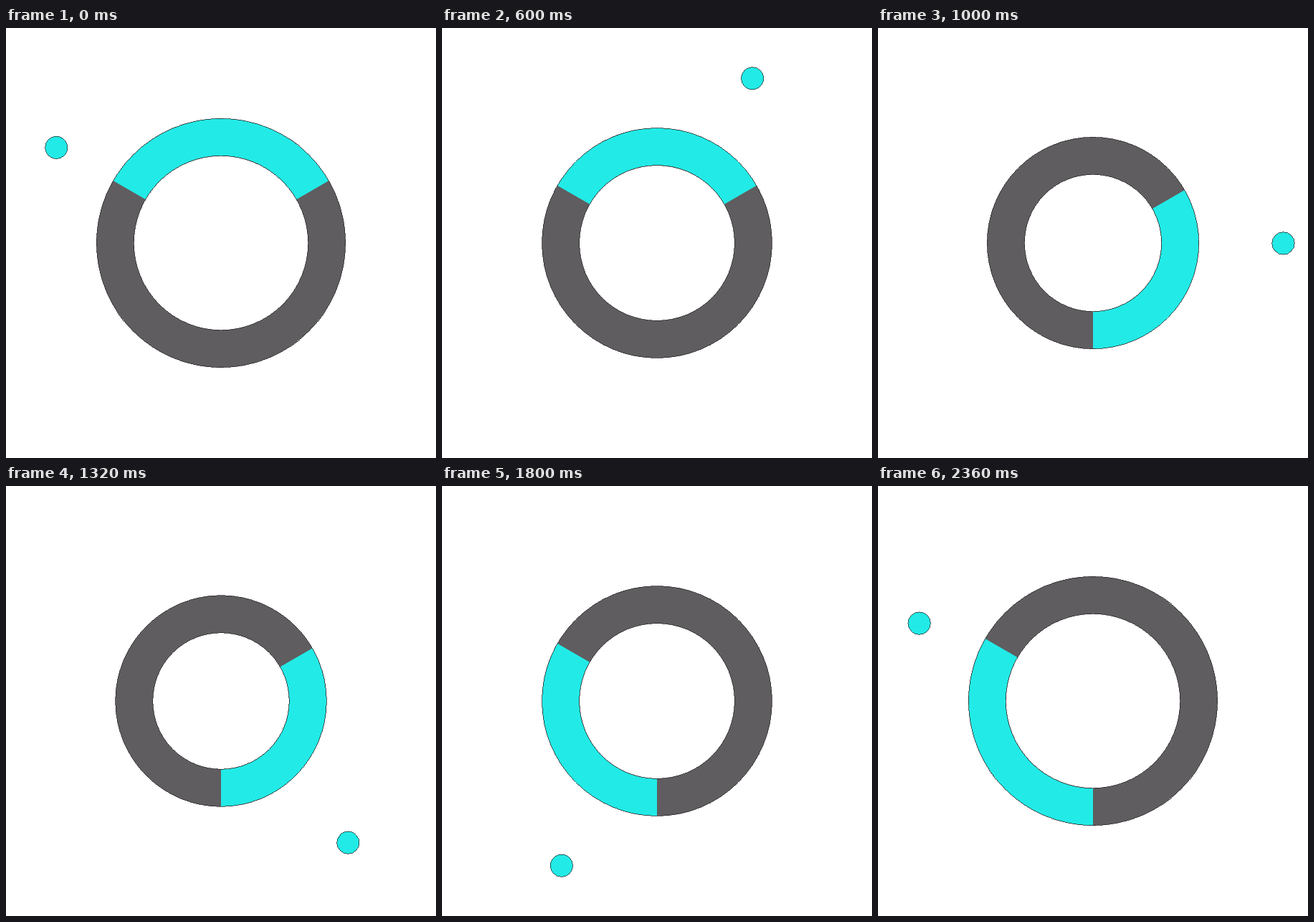
Recreate the animation shown at these times as an HTML page. Size 600 px wide and 600 px high, loop 2400 ms.

```html
<!DOCTYPE html>
<html lang="en">
<head>
<meta charset="utf-8">
<title>Orbiting dot and ring</title>
<style>
  html, body { margin: 0; width: 100%; height: 100%; overflow: hidden; background: #fff; }
  svg { display: block; width: 100vw; height: 100vh; }
</style>
</head>
<body>
<svg viewBox="0 0 600 600">
  <g transform="translate(300 300)" fill="none">
    <circle id="ring" stroke="#605d60" shape-rendering="crispEdges"/>
    <path id="arc" stroke="#22eae6"/>
    <g stroke="#1c1c1c" stroke-width=".7" shape-rendering="crispEdges">
      <circle id="outer"/>
      <circle id="inner"/>
      <circle id="dot" r="15.7" fill="#22eae6"/>
    </g>
  </g>
</svg>
<script>
const LOOP = 2400, STEP = 40;
const ORBIT = 265.5, DOT_START = 210.1;
const BAND = 52.1, R_MAX = 173.7, R_SPAN = 26.5;

const [ring, arc, outer, inner, dot] =
  ['ring', 'arc', 'outer', 'inner', 'dot'].map(id => document.getElementById(id));

const set = (el, attrs) => {
  for (const k in attrs) el.setAttribute(k, attrs[k]);
};
const polar = (r, deg) => {
  const a = deg * Math.PI / 180;
  return [r * Math.cos(a), r * Math.sin(a)];
};
const easeInOut = x => x < 0.5 ? 4 * x ** 3 : 1 - 4 * (1 - x) ** 3;

function draw(t) {
  const p = t / LOOP;
  const r = R_MAX - R_SPAN * easeInOut(1 - Math.abs(1 - 2 * p));
  const mid = r - BAND / 2;

  // The lit third is the one the dot is passing.
  const from = 210 + 120 * Math.floor(p * 3);
  const a = polar(mid, from), b = polar(mid, from + 120);
  set(ring, { r: mid, 'stroke-width': BAND });
  set(arc, { d: `M${a}A${mid} ${mid} 0 0 1 ${b}`, 'stroke-width': BAND - 0.6 });
  set(outer, { r });
  set(inner, { r: r - BAND });

  const [cx, cy] = polar(ORBIT, DOT_START + 360 * p);
  set(dot, { cx, cy });
}

const start = performance.now();
function tick() {
  const t = (performance.now() - start) % LOOP;
  draw(Math.floor(t / STEP) * STEP);
  requestAnimationFrame(tick);
}
draw(0);
requestAnimationFrame(tick);
</script>
</body>
</html>
```
